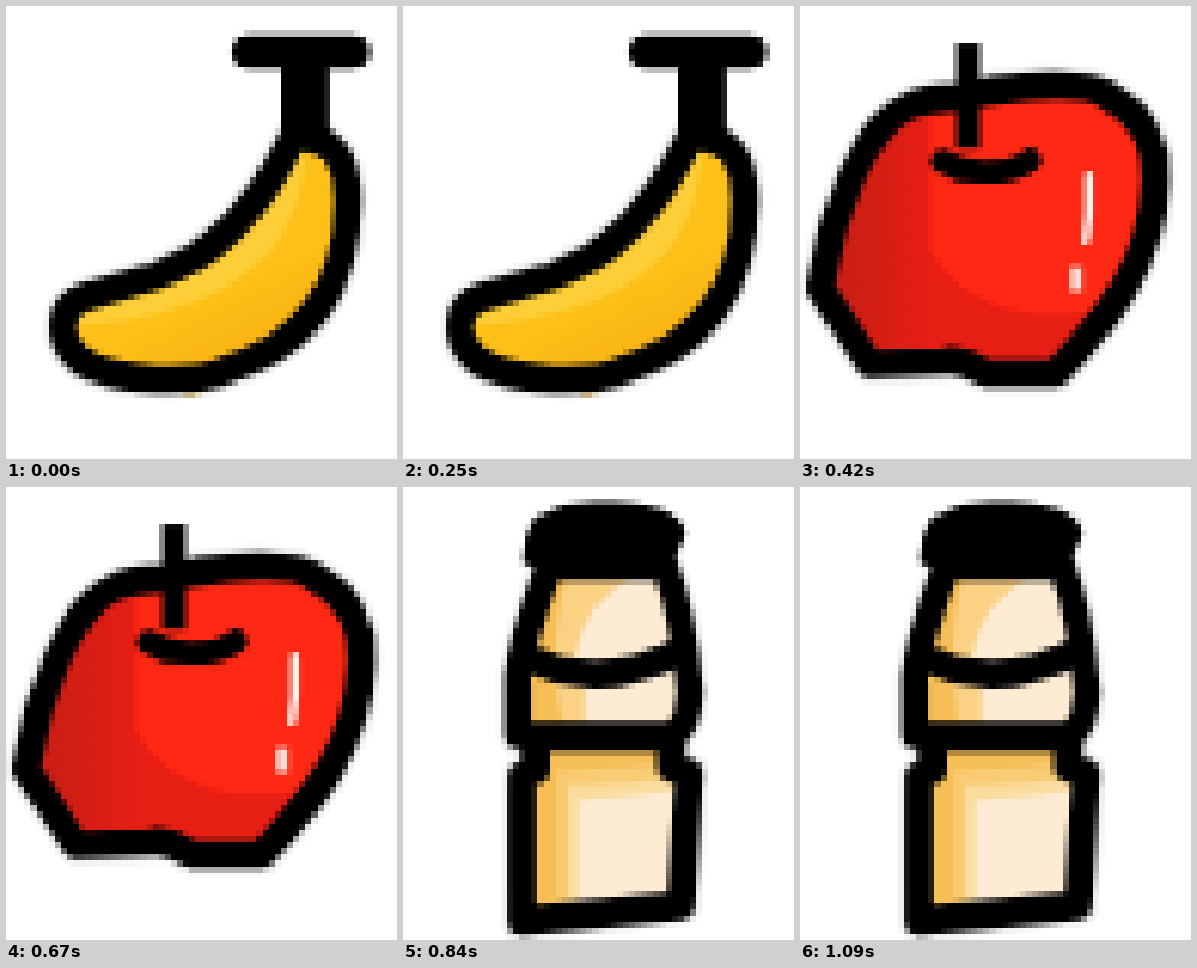
An HTML page with a canvas that plays this animation: 391 px wide and 453 px high, repeating every 1.26 s.

```html
<!DOCTYPE html>
<html lang="en">
<head>
<meta charset="utf-8">
<title>Fruit and bottle</title>
<style>
html, body { margin: 0; width: 100%; height: 100%; overflow: hidden; background: #fff; }
canvas { display: block; }
</style>
</head>
<body>
<canvas id="stage" width="391" height="453"></canvas>
<script>
const W = 391, H = 453, COLS = 64, ROWS = 74, HOLD = 420;
const stage = document.getElementById('stage').getContext('2d');
stage.imageSmoothingEnabled = false;

function fill(g, color, d) {
  g.fillStyle = color;
  g.fill(new Path2D(d));
}

function line(g, color, width, d, cap = 'round') {
  g.strokeStyle = color;
  g.lineWidth = width;
  g.lineCap = cap;
  g.lineJoin = 'round';
  g.stroke(new Path2D(d));
}

function fade(g, x0, y0, x1, y1, from, to) {
  const grad = g.createLinearGradient(x0, y0, x1, y1);
  grad.addColorStop(0, from);
  grad.addColorStop(1, to);
  return grad;
}

// A thick black contour with a faint halo, around a base colour and soft shading.
function outlined(g, d, width, base, shade) {
  line(g, 'rgba(0, 0, 0, .08)', width + 11, d);
  fill(g, base, d);
  g.save();
  g.clip(new Path2D(d));
  g.filter = 'blur(0.6px)';
  shade();
  g.restore();
  line(g, '#000', width, d);
}

function banana(g) {
  line(g, '#d7ad4d', 5, 'M181 387h9');
  const skin = fade(g, 200, 290, 240, 370, '#fdc018', '#f8b012');
  const contour = 'M288 130C262 185 225 245 150 270L80 291C50 300 50 335 75 355' +
    'C110 378 190 376 215 366C310 338 342 275 342 195C342 150 325 130 288 130Z';
  outlined(g, contour, 28, skin, () => {
    fill(g, '#fdce37', 'M299 120C310 270 190 315 50 322V120Z');
  });
  line(g, '#000', 48, 'M299 60V130', 'butt');
  line(g, '#000', 34, 'M243 46H347');
  line(g, '#000', 28, 'M232 46H358', 'butt');
}

function apple(g) {
  const skin = fade(g, 35, 0, 130, 0, '#c71e14', '#e61e14');
  const contour = 'M20 282C30 215 62 118 112 99Q125 93 160 91L190 85C240 78 290 76 310 91' +
    'C345 110 357 135 355 175C353 260 305 315 256 367H185Q165 352 145 355L70 358Z';
  outlined(g, contour, 28, skin, () => {
    fill(g, '#ff2814', 'M130 60V240Q145 290 230 308H400V60Z');
  });
  line(g, '#000', 24, 'M168 37V142', 'butt');
  line(g, '#000', 24, 'M143 155Q158 166 185 166Q215 166 230 154');
  line(g, '#fff0ea', 9, 'M289 170V208L286 234');
  line(g, '#ffdcd5', 12, 'M276 261V285', 'butt');
}

function bottle(g) {
  const amber = '#f5be56', honey = '#fbd186', cream = '#fdebd3';

  const label = 'M132 250V283L119 290V434L200 426L278 418L286 286L268 280V250Z';
  outlined(g, label, 29, amber, () => {
    ['#f9cc73', '#fbdc9f', cream].forEach((tone, i) => {
      const x = 154 + 11 * i, y = 283 + 15 * i;
      fill(g, tone, `M${x} ${y}Q230 ${y} 300 ${y - 14}V440H${x}Z`);
    });
  });

  const shoulders = 'M146 80C135 110 118 155 115 190V248H270Q287 235 287 205Q280 125 262 80Z';
  outlined(g, shoulders, 27, amber, () => {
    fill(g, honey, 'M172 70Q140 130 160 250H300V70Z');
    fill(g, cream, 'M240 85Q180 105 168 185H182V250H300V85Z');
  });
  line(g, '#000', 28, 'M122 170Q195 208 278 164');
  fill(g, '#000', 'M132 31Q160 14 200 16Q255 14 275 32Q288 42 278 58L268 81H130L120 75Q118 50 132 31Z');
}

// Paint on a coarse grid and soften slightly; square cells appear when enlarged.
function render(draw) {
  const [sharp, soft] = ['sharp', 'soft'].map(() => {
    const g = Object.assign(document.createElement('canvas'), { width: COLS, height: ROWS }).getContext('2d');
    g.fillStyle = '#fff';
    g.fillRect(0, 0, COLS, ROWS);
    return g;
  });
  sharp.scale(COLS / W, ROWS / H);
  draw(sharp);
  soft.filter = 'blur(0.6px)';
  soft.drawImage(sharp.canvas, 0, 0);
  return soft.canvas;
}

const pictures = [banana, apple, bottle].map(render);
const start = performance.now();

function tick() {
  const index = Math.floor((performance.now() - start) / HOLD) % pictures.length;
  stage.fillStyle = '#fff';
  stage.fillRect(0, 0, W, H);
  stage.drawImage(pictures[index], 0, 0, W, H);
  requestAnimationFrame(tick);
}
tick();
</script>
</body>
</html>
```
